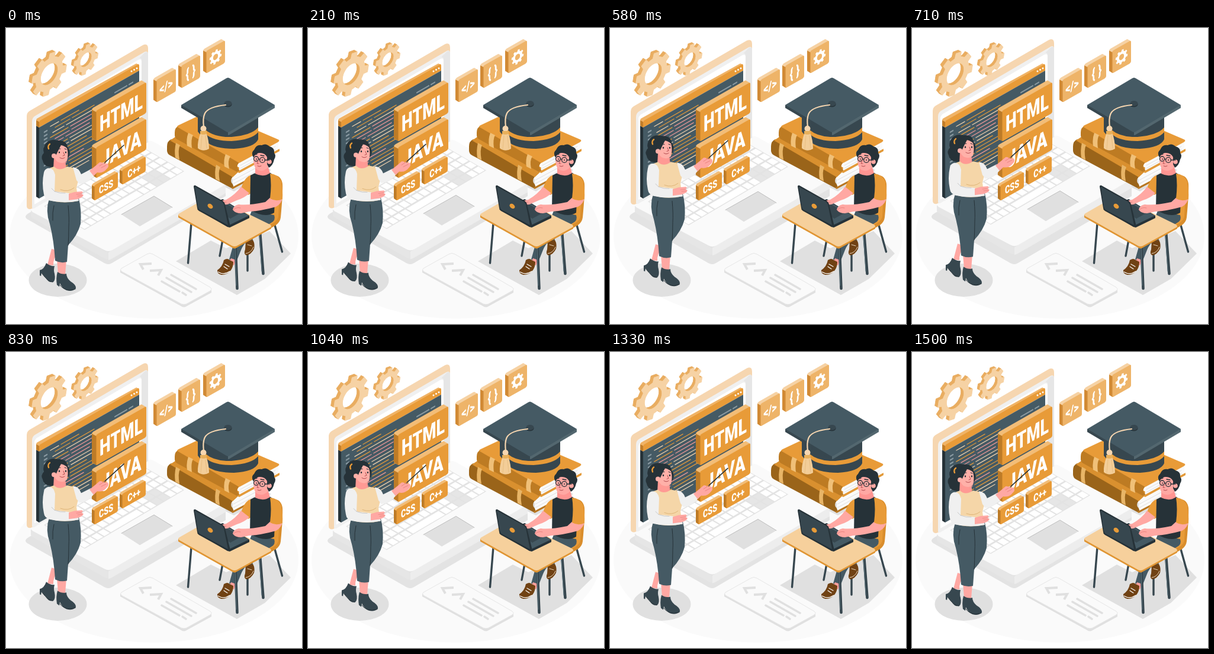
An HTML page that plays this animation: 500 px wide and 500 px high, repeating every 1540 ms.

```html
<!DOCTYPE html>
<html lang="en">
<head>
<meta charset="utf-8">
<title>Learning to code</title>
<style>
html,body{margin:0;width:100%;height:100%;overflow:hidden;background:#fff}
svg{display:block;width:100vw;height:100vh}
text{font-family:Roboto,Arial,sans-serif;font-weight:900;text-anchor:middle;fill:#fff}
.ln{fill:none;stroke-linecap:round;stroke-linejoin:round}
</style>
</head>
<body>
<svg viewBox="0 0 500 500">
<ellipse cx="250" cy="351" rx="244" ry="140" fill="#fafafa"/>
<path d="M33 319Q33 316 38 313L235 203L371 268V284L179 397Q173 401 166 397L36 323Q33 321 33 319Z" fill="#e3e3e3"/>
<ellipse cx="87.500" cy="426" rx="49" ry="28" fill="#e0e0e0"/>

<g id="laptop">
  <path d="M42 306V317Q42 320 46 322L166 389Q173 393 180 389L371 279V263L173 380Z" fill="#e6e6e6"/>
  <path d="M173 379V392Q177 391 180 389L371 279V264Z" fill="#ededed"/>
  <path d="M42 308Q41 305 45 303L238 192Q243 189 249 192L368 259Q373 262 368 266L180 375Q173 379 166 375L45 311Z" fill="#fafafa"/>
  <path d="M64 301L232 202L301 242L133 341Z" fill="#e3e3e3"/>
  <g id="keys" fill="#fff"></g>
  <path d="M195 315L250 284L281 303L226 335Z" fill="#e0e0e0"/>
  <path class="ln" d="M195 315L250 284L281 303" stroke="#bdbdbd"/>
  <path d="M35 301V149Q35 143 40 140L231 29Q240 25 240 35V44L46 156V304L41 306Q35 306 35 301Z" fill="#f6d6b0"/>
  <path d="M44 304V158Q44 151 50 148L233 41Q240 37 240 45V193L47 305Z" fill="#f0f0f0"/>
  <path d="M48 298V162Q48 157 52 154L223 54Q229 51 229 57V194Z" fill="#fff"/>
  <path d="M229 55Q229 50 225 51L234 42Q240 38 240 45V193L229 199Z" fill="#e6e6e6"/>
</g>

<path d="M51 165V285L56 288V168Z" fill="#263238"/>
<path d="M51 156Q51 153 54 152L220 60L225 62L56 158V168L51 165Z" fill="#f0b366"/>
<path d="M51 156L56 158.500V168L51 165Z" fill="#c27e2a"/>
<path d="M56 168V159Q56 157 58 156L222 62Q225 60 225 64V72Z" fill="#e89b38"/>
<path d="M56 168L225 72V192L56 288Z" fill="#455a64"/>
<g fill="#fff"><circle cx="212" cy="73" r="1.500"/><circle cx="216.500" cy="70.500" r="1.500"/><circle cx="221" cy="68" r="1.500"/></g>
<g id="code" class="ln" transform="matrix(1 -.57 0 1 56 168)"></g>
<g id="props"></g>

<!-- books -->
<path d="M371 260L432 230L448 240L385 276L371 269Z" fill="#e0e0e0"/>
<path d="M383 250L436 222V241L383 270Z" fill="#fafafa"/>
<path class="ln" d="M384 257L434 230M384 263L434 236" stroke="#e0e0e0"/>
<path d="M279 188Q272 191 272 200V207Q272 212 277 215L380 270Q386 270 383 264Q377 259 383 251Z" fill="#9a641a"/>
<path d="M277 190L292 180L398 238L383 252Z" fill="#d9902f"/>
<path d="M380 270L437 240V243L383 272Z" fill="#b87620"/>
<path d="M287 194L294 198Q290 205 293 223L286 219Q284 207 287 194ZM355 231L362 235Q358 242 361 259L354 255Q352 243 355 231Z" fill="#e8b567"/>
<path d="M395 226L460 192V209L393 242Z" fill="#fafafa"/>
<path class="ln" d="M396 232L455 200M396 237L455 205" stroke="#e0e0e0"/>
<path d="M291 166Q285 168 285 177V181Q285 186 289 188L390 243Q396 245 394 240Q387 235 394 227Z" fill="#bd7b23"/>
<path d="M289 167Q289 165 292 164L345 139L459 188Q464 190 459 193L394 228Z" fill="#e89b38"/>
<path d="M390 243L462 204V208L394 245Z" fill="#e39a39"/>
<path d="M308 177L316 181Q312 188 314 203L306 199Q304 188 308 177ZM371 213L379 217Q374 224 377 238L369 234Q367 223 371 213Z" fill="#f0c078"/>

<!-- cap -->
<path d="M324 145L426 148V188Q420 202 385 204Q352 204 338 192L324 175Z" fill="#37474f"/>
<path d="M337 172Q352 185 381 184Q415 181 426 168V176Q415 189 381 191Q350 191 337 179Z" fill="#e89b38"/>
<path d="M296 130V135L372 180Q375 182 375 181V150Z" fill="#37474f"/>
<path d="M375 150V181Q377 181 378 180L454 135V130Z" fill="#53676f"/>
<path d="M296 130L372 85Q375 83 378 85L454 130L378 175Q375 177 372 175Z" fill="#455a64"/>
<ellipse cx="375" cy="129" rx="6.500" ry="4.500" fill="#263238"/>
<ellipse cx="375" cy="127.500" rx="6.500" ry="4.500" fill="#37474f"/>
<path class="ln" d="M371 130Q342 133 336 144Q332 152 334 167" stroke="#f6d6b0" stroke-width="2.200"/>
<path d="M329 176Q323 192 324 203Q333 210 343 204Q343 190 338 176Z" fill="#f3cd98"/>
<path class="ln" d="M331 182L329 204M337 182L339 203" stroke="#e3b878" stroke-width=".7"/>
<circle cx="333.500" cy="170" r="5" fill="#f6d6b0"/><path d="M328 174H339V179Q333 181 328 179Z" fill="#e8b05c"/>

<!-- floor card -->
<path d="M193 408V413L296 470Q300 473 305 470L347 447V442L300 464Z" fill="#e0e0e0"/>
<path d="M195 406L238 382Q243 379 248 382L345 438Q349 441 345 444L305 466Q300 468 296 466L195 411Q192 408 195 406Z" fill="#fafafa" stroke="#e6e6e6"/>
<path class="ln" d="M246 397L227 398L232 407M243 409L262 408L257 417" stroke="#e0e0e0" stroke-width="4" style="stroke-linecap:butt;stroke-linejoin:miter" transform="translate(0 1)"/>
<path class="ln" d="M279 417L321 441M271 422L313 446M263 428L293 445M298 447L304 451" stroke="#e0e0e0" stroke-width="3.500"/>

<!-- student -->
<path d="M287 394L346 359L372 372L445 343L481 381L437 424L390 451Z" fill="#e0e0e0"/>
<g class="ln" stroke="#37474f">
  <path d="M313 330L307.500 397M366 358L361 385M408 362V410M454 333L466.500 378" stroke-width="3.400"/>
</g>
<path d="M447 249Q464 246 467 263Q468 278 464 320Q463 328 456 333L420 354L402 344L444 316Z" fill="#d98d2c"/>
<path d="M448 248Q463 249 463 266L460 318Q459 325 452 329L420 348L403 339L444 314Z" fill="#e89b38"/>
<path d="M415 309L453 316Q456 325 448 329L419 347L415 365L405 365L399 349Z" fill="#455a64"/>
<path d="M388 352L422 334L430 343Q404 357 397 375L389 395L377 391Z" fill="#455a64"/>
<path d="M380 389L389 392L385 401L376 398Z" fill="#ff9f9c"/>
<path d="M368 392Q374 388 378 392L384 395Q384 403 380 409Q374 417 364 417Q356 415 357 409Q366 403 368 392Z" fill="#704214"/>
<path class="ln" d="M358 412Q368 418 378 411M370 399L377 403M368 403L374 407" stroke="#fff" stroke-width="1.200"/>
<path d="M405 360L417 358Q421 365 419 373Q414 383 406 384Q401 382 404 374Z" fill="#704214"/>
<path class="ln" d="M405 381Q414 380 418 370M408 366L415 368" stroke="#e9d5bd"/>
<g class="ln" stroke="#37474f" stroke-width="4.600">
  <path d="M387.500 367L390.500 440M429 344L434.500 415"/>
  <path d="M387 371L389 435M428 349L432 411" stroke="#607780" stroke-width="1"/>
</g>
<path d="M415 248Q403 251 397 271L409 282L424 274L424 249Z" fill="#e89b38"/>
<path d="M413 249Q424 242 439 242Q453 245 456 258L453 312Q437 322 412 307Z" fill="#263238"/>
<path d="M421 232H442L446 245Q435 253 421 246Z" fill="#ff9592"/>
<path d="M419 214Q429 205 444 211Q449 228 441 237Q431 245 422 238Q416 228 419 214Z" fill="#ffa8a3"/>
<path d="M418 219Q413 210 419 206Q423 196 432 198Q439 194 445 200Q454 202 453 211Q457 216 453 222Q451 232 444 236L441 230V218Q437 210 427 211Q421 212 418 219Z" fill="#263238"/>
<circle cx="445" cy="226" r="3.800" fill="#ffa8a3"/>
<g class="ln" stroke="#263238" stroke-width="1.300"><circle cx="422.500" cy="221" r="4"/><circle cx="433" cy="223" r="4.400"/><path d="M426.500 221L429 222M437 223L445 223M419 214L424 213M430 215L436 216"/></g>
<g fill="#263238"><circle cx="423" cy="221.500" r="1"/><circle cx="433" cy="223" r="1"/></g>
<path class="ln" d="M426 224L424 229L427 229M425 233Q428 235 431 233" stroke="#b34c50"/>
<path d="M291 315V320L382 371Q386 374 390 371L448 339V334L386 364Z" fill="#e09533"/>
<path d="M293 313L342 285Q346 283 350 285L446 332Q450 335 446 337L390 368Q386 370 382 368L293 318Q289 315 293 313Z" fill="#f6d09c"/>
<path d="M323 306L366 289L411 317V321L378 337L374 336Z" fill="#263238"/>
<path d="M340 307L367 291L410 317L377 333Z" fill="#455a64"/>
<path d="M355 306L372 297L397 312L379 322Z" fill="#37474f"/>
<path d="M397 268L411 279Q403 287 390 291L374 298Q366 299 363 295Q363 291 372 290Q388 281 397 268Z" fill="#ffa8a3"/>
<path d="M450 283L467 285Q466 297 456 302Q431 309 411 310L397 313Q387 313 383 307Q384 300 393 298Q409 300 438 294Z" fill="#ffa8a3"/>
<path class="ln" d="M384 307Q389 302 396 304M365 296L372 294" stroke="#e9837f"/>
<path d="M446 246Q460 247 465 260Q468 274 467 289Q456 294 446 288Q449 264 446 246Z" fill="#e89b38"/>
<path d="M317 268Q317 265 320 266L366 292Q369 294 370 298L379 335Q376 337 373 335L326 309Q323 307 323 304Z" fill="#263238"/>
<path d="M319 268L364 293Q367 295 368 298L375 333L327 307Q325 306 324 302Z" fill="#37474f"/>
<ellipse cx="345" cy="301" rx="5" ry="3.600" transform="rotate(38 345 301)" fill="#e89b38"/>

<!-- teacher -->
<g id="teacher">
  <path d="M77 373L89 377Q79 390 80 401L70 400Z" fill="#ffa8a3"/>
  <path d="M68 397Q75 403 82 402Q80 409 82 415Q84 425 80 429Q72 431 67 422L60 414L59 419L57 418V409Q64 408 68 397Z" fill="#37474f"/>
  <path d="M86 391L102 391L100 417L88 415Z" fill="#ffa8a3"/>
  <path d="M87 412Q94 417 102 415Q102 422 109 428Q119 434 118 440Q112 446 102 443Q95 440 91 431L90 437L86 434Q84 422 87 412Z" fill="#37474f"/>
  <path class="ln" d="M91 434Q96 442 108 443L117 441M61 415Q71 429 79 429" stroke="#263238" stroke-width="1"/>
  <path d="M73 288H123Q128 307 126 331Q121 350 105 367L103 395Q93 398 83 393Q81 359 74 331Q66 309 73 288Z" fill="#455a64"/>
  <path class="ln" d="M105 300Q107 322 106 336Q106 352 105 367M81 300Q78 312 79 325" stroke="#263238" stroke-width="1"/>
  <path d="M68 194Q76 187 87 190Q102 189 104 201Q110 209 106 218L88 231L79 235Q64 235 62 224Q58 217 64 211Q61 203 68 194Z" fill="#263238"/>
  <path d="M81 219L100 222L102 240Q91 248 80 238Z" fill="#ff9a94"/>
  <path d="M83 203Q91 193 103 203Q106 213 103 224Q97 231 87 226Q80 220 80 211Z" fill="#ffb0a8"/>
  <path d="M78 205Q82 191 95 194Q88 207 83 218Q78 216 78 205Z" fill="#263238"/>
  <circle cx="81" cy="216" r="4" fill="#ffb0a8"/>
  <path class="ln" d="M72 204Q70 199 74 196" stroke="#e89b38" stroke-width="2.400"/>
  <g fill="#263238"><ellipse cx="90" cy="210" rx="1.200" ry="1.600"/><ellipse cx="101" cy="210" rx="1.200" ry="1.600"/></g>
  <path class="ln" d="M87 206Q89 203 92 204M99 204L102 205" stroke="#263238"/>
  <path class="ln" d="M97 210L99 215L96 216M91 219Q95 222 99 219" stroke="#b34c50"/>
  <path d="M81 234Q90 243 103 234L118 237Q123 244 123 253L119 270L122 292Q96 298 71 290L73 260L68 239Z" fill="#f5d6a8"/>
  <path d="M71 283Q96 289 121 283L123 292Q96 297 71 291Z" fill="#f0f0f0"/>
  <path class="ln" d="M92 273Q105 278 115 270" stroke="#dfb577" stroke-width="1"/>
  <path d="M113 235Q123 236 127 247L143 239L150 247Q137 264 124 263L119 257Z" fill="#f0f0f0"/>
  <path d="M141 241L151 233L158 227Q162 226 164 229L172 229Q175 234 170 238Q164 246 154 244L148 250Z" fill="#ffa8a3"/>
  <path class="ln" d="M166 228L199 198" stroke="#263238" stroke-width="1.600"/>
  <path class="ln" d="M158 233L167 227M161 236L169 232" stroke="#e9837f"/>
  <path d="M70 237Q80 235 83 248L82 276L107 279L108 291Q92 295 75 291Q65 290 64 281Q60 262 64 244Q65 239 70 237Z" fill="#f0f0f0"/>
  <path class="ln" d="M82 276L77 271M82 276Q92 280 100 279" stroke="#c8c8c8"/>
  <path d="M106 280L116 277L128 276Q132 278 127 280L131 282Q129 287 121 289L106 291Z" fill="#ffa8a3"/>
  <path class="ln" d="M119 281L128 280M121 284L129 283" stroke="#e9837f" stroke-width=".8"/>
</g>
</svg>
<script>
const NS = 'http://www.w3.org/2000/svg', LOOP = 1540, LIFT = 9;
const $ = id => document.getElementById(id);
const add = (parent, tag, attrs) => {
  const e = document.createElementNS(NS, tag);
  for (const k in attrs) e.setAttribute(k, attrs[k]);
  return parent.appendChild(e);
};
const props = $('props');

function gearPath(r, hole, teeth, root = .78) {
  const pt = (rad, a) => (rad * Math.cos(a)).toFixed(2) + ' ' + (rad * Math.sin(a)).toFixed(2);
  const step = 2 * Math.PI / teeth, pts = [];
  for (let i = 0; i < teeth; i++) {
    const a = i * step + .2;
    pts.push(pt(r * root, a - step * .29), pt(r, a - step * .2), pt(r, a + step * .2), pt(r * root, a + step * .29));
  }
  return `M${pts.join('L')}ZM${hole} 0A${hole} ${hole} 0 1 0 ${-hole} 0A${hole} ${hole} 0 1 0 ${hole} 0Z`;
}

function gear(x, y, r, hole, depth) {
  const d = gearPath(r, hole, 8);
  for (let k = depth; k >= 0; k--) {
    const ink = k ? '#e9ad61' : '#f6d2a4';
    add(props, 'path', {
      d, transform: `matrix(.866 -.5 0 1 ${x - k} ${y - k * .57})`, 'fill-rule': 'evenodd',
      fill: ink, stroke: ink, 'stroke-width': 1, 'stroke-linejoin': 'round'
    });
  }
}

// Upright slab; returns a group whose origin is the middle of its face
const BOLD = {face: '#e89b38', side: '#bd7b27', top: '#f2bd78'};
const PALE = {face: '#eeb469', side: '#d18a35', top: '#f6d2a4'};
function tile(x, y, w, h, depth, tone, label, size, squeeze = .7) {
  for (let k = depth; k >= 0; k--) add(props, 'rect', {
    width: w, height: h, rx: 2.5, fill: k ? tone.top : tone.face,
    transform: `matrix(1 -.57 0 1 ${x - k} ${y - k * .57})`
  });
  const top = y + 2, low = y + h - 2;
  add(props, 'path', {
    d: `M${x - depth} ${top - depth * .57}L${x + .5} ${top}V${low + 1}L${x - depth} ${low - depth * .57}Z`, fill: tone.side
  });
  const face = add(props, 'g', {
    transform: `matrix(${squeeze} ${-.57 * squeeze} 0 1 ${x + w / 2} ${y + h / 2 - w * .285})`
  });
  if (label) add(face, 'text', {y: size * .37, 'font-size': size}).textContent = label;
  return face;
}

gear(73, 78, 34, 17, 5);
gear(135, 53.500, 24, 11.500, 4);
tile(152, 140, 85, 52, 7, BOLD, 'HTML', 38);
tile(152, 202, 85, 52, 7, BOLD, 'JAVA', 39);
tile(149, 266, 40, 26, 4, BOLD, 'CSS', 18);
tile(196, 240, 40, 25, 4, BOLD, 'C++', 18);
tile(254, 88, 33, 38, 5, PALE, '</>', 22, .75);
tile(296, 64, 32, 38, 5, PALE, '{ }', 25, .75);
add(tile(338, 39, 32, 38, 5, PALE, '', 0, .866), 'path', {d: gearPath(12, 4.8, 8), fill: '#fff', 'fill-rule': 'evenodd'});

// Keyboard: 5 rows, the last one holds a wide space bar
const ROWS = 5, COLS = 15;
const spot = (u, v) => `${(64 + 168 * u + 69 * v).toFixed(1)} ${(301 - 99 * u + 40 * v).toFixed(1)}`;
for (let r = 0; r < ROWS; r++) for (let c = 0; c < COLS; c++) {
  const span = r === ROWS - 1 && c === 4 ? 5 : 1;
  const u0 = (c + .09) / COLS, u1 = (c + span - .09) / COLS, v0 = (r + .1) / ROWS, v1 = (r + .9) / ROWS;
  add($('keys'), 'path', {
    d: `M${spot(u0, v0)}L${spot(u1, v0)}L${spot(u1, v1)}L${spot(u0, v1)}Z`,
    fill: c > 10 && c < 13 && r > 2 ? '#e6e6e6' : '#fff'
  });
  c += span - 1;
}

const code = $('code');
const dash = (x, y, w, stroke, width = 1.4) =>
  add(code, 'path', {d: `M${x} ${y}h${w}`, stroke, 'stroke-width': width});
const inks = ['#f6d6b0', '#e89b38', '#f6d6b0', '#e89b38', '#f29a98', '#f29a98', '#e89b38'];
for (let i = 0; i < 16; i++) {
  const y = 9 + i * 6.3, x = 19 + (i * 5 % 3) * 4, ink = inks[i % 7];
  const first = 14 + i * 11 % 17;
  dash(x, y, first, ink);
  dash(x + first + 4, y, 30 + i * 7 % 25, inks[(i + (i % 3 ? 0 : 1)) % 7]);
  if (i < 10) dash(9, y + 4, 4, '#8b9ba3', 2.500);
}
for (const [x, y, w] of [[128, 14, 20], [152, 14, 6], [128, 21, 14], [146, 21, 14], [130, 86, 20], [154, 86, 6]])
  dash(x, y, w, '#8b9ba3', 2.200);

const movers = [$('laptop'), $('teacher')];
function draw(now) {
  const lift = LIFT * (1 - Math.cos(2 * Math.PI * (now % LOOP) / LOOP)) / 2;
  for (const m of movers) m.setAttribute('transform', `translate(0 ${-lift.toFixed(2)})`);
}
const start = performance.now();
function tick() {
  draw(performance.now() - start);
  requestAnimationFrame(tick);
}
tick();
</script>
</body>
</html>
```
